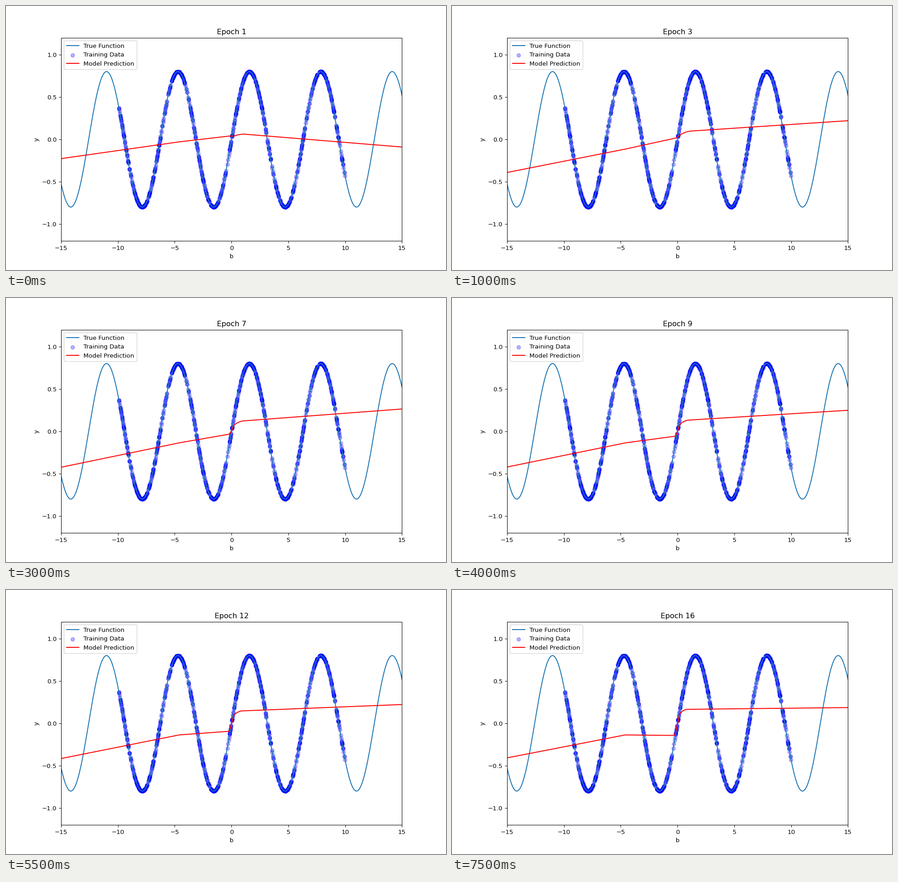
Recreate the animation shown at these times as a matplotlib script. Size 966 px wide and 580 px high, loop 8 s.

```python
import numpy as np
import matplotlib.pyplot as plt
from matplotlib.animation import FuncAnimation

W, H, DPI = 966, 580, 96.6
EPOCHS = 16


def wave(x):
    return 0.8 * np.sin(x)


def bend(p, q, fx, fy):
    """Quadratic curve from p to q, control point at a fraction of the way."""
    p, q = np.array(p), np.array(q)
    c = p + (q - p) * (fx, fy)
    t = np.linspace(0, 1, 16)[:, None]
    return (1 - t) ** 2 * p + 2 * t * (1 - t) * c + t ** 2 * q


def prediction(e):
    """Fit after epoch e: a quick early swing, then a steady drift."""
    swing = np.exp(-0.8 * (e - 1))
    left = (-15, -0.44 + 0.002 * e + 0.21 * swing)
    kink = (-4.6, -0.137 + 0.107 * swing)
    low = (-0.1 - 0.012 * e, 0.052 - 0.0122 * e)
    steep = (0.18, 0.03 + 0.005 * e)
    high = (0.65 + 3 / (e + 1) - 1.1 * swing,
            0.09 + 0.0047 * e - 0.033 * swing)
    right = (15, 0.33 - 0.009 * e - 0.412 * swing)
    return np.vstack([left, kink, bend(low, steep, 0.3, 0.1),
                      bend(steep, high, 0.36, 0.78), right])


# The sliver added to each side keeps rounding from losing a pixel
fig, ax = plt.subplots(figsize=((W + 0.01) / DPI, (H + 0.01) / DPI), dpi=DPI)
np.random.seed(42)
data = np.random.uniform(-10, 10, 1000)
grid = np.linspace(-15, 15, 600)
ax.plot(grid, wave(grid), label="True Function")
ax.scatter(data, wave(data), color="blue", alpha=0.3, label="Training Data")
fit, = ax.plot([], [], color="red", label="Model Prediction")
ax.set(xlim=(-15, 15), ylim=(-1.2, 1.2), xlabel="b", ylabel="y")
ax.legend(loc="upper left")
title = ax.set_title("Epoch 1")


def update(i):
    fit.set_data(*prediction(i + 1).T)
    title.set_text(f"Epoch {i + 1}")
    return fit, title


anim = FuncAnimation(fig, update, frames=EPOCHS, interval=500, repeat=True,
                     repeat_delay=0)
plt.show()
```
